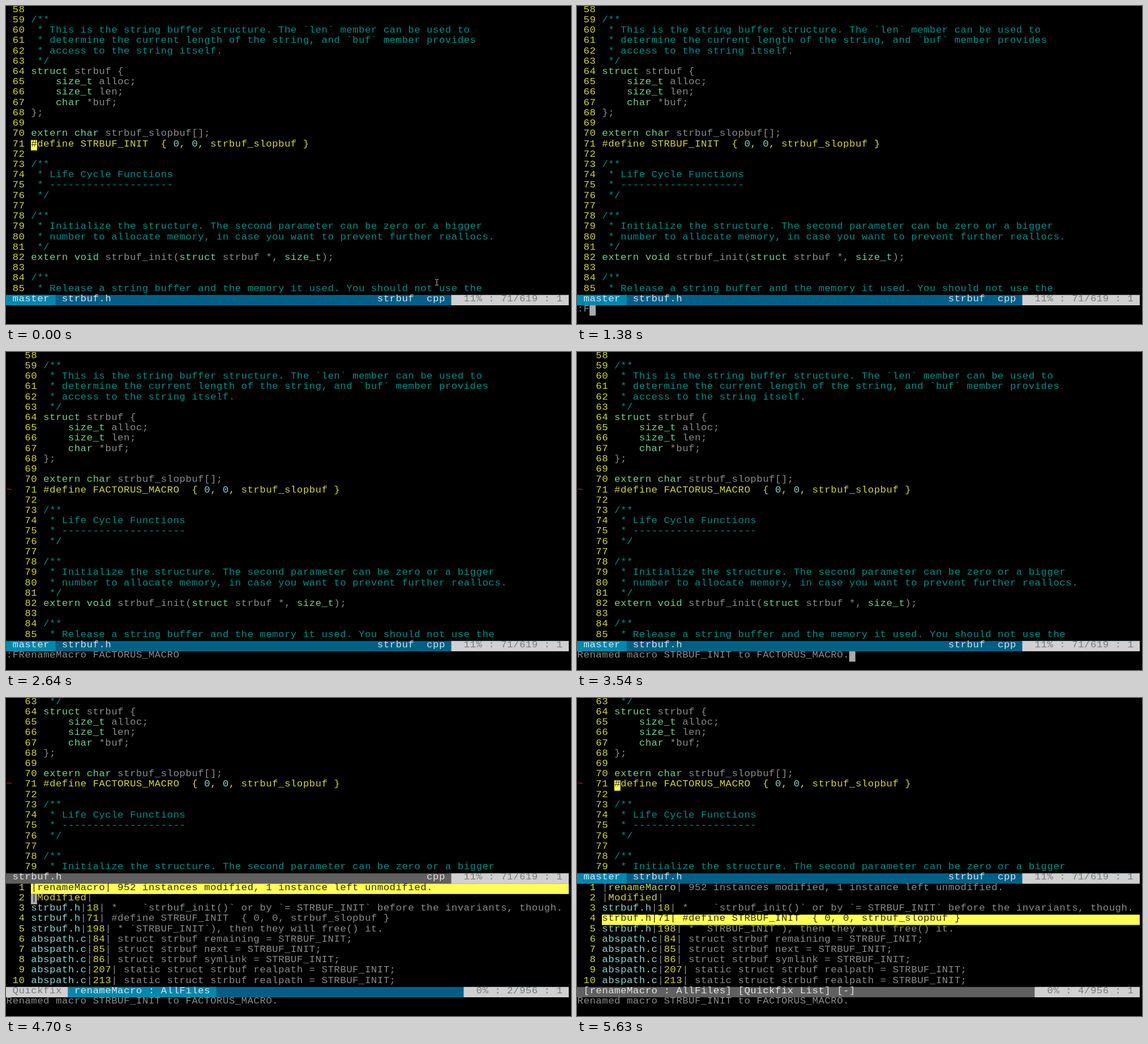
Write an HTML page with a canvas that moves like this. It is 998 px wide and 561 px high and loops after 9930 ms.

```html
<!DOCTYPE html>
<html>
<head>
<meta charset="utf-8">
<style>
html, body { margin: 0; width: 100%; height: 100%; overflow: hidden; background: #000; }
canvas { display: block; }
</style>
</head>
<body>
<canvas id="stage" width="998" height="561"></canvas>
<script>
const ctx = document.getElementById('stage').getContext('2d');
const LOOP = 9930, COLS = 91, W = 10.92, H = 18.22, LEFT = 0.3, TOP = -0.4, BASE = 11.1;
const FONT = '17.4px "Liberation Mono", "Courier New", monospace';
const FG = '#aaa', YELLOW = '#ffff55', GREEN = '#87ffaf', CYAN = '#00aaaa', PALE = '#afffff';
const BLUE = '#005f87', LIGHT_BLUE = '#0087af', GREY = '#606060', SILVER = '#d0d0d0', DIM = '#666', WHITE = '#fff';
const OLD = 'STRBUF_INIT', NEW = 'FACTORUS_MACRO';
const COMMAND = ':FRenameMacro ' + NEW;
const MESSAGE = `Renamed macro ${OLD} to ${NEW}.`;

// Buffer lines 58 to 85
const source = `
/**
 * This is the string buffer structure. The \`len\` member can be used to
 * determine the current length of the string, and \`buf\` member provides
 * access to the string itself.
 */
struct strbuf {
    size_t alloc;
    size_t len;
    char *buf;
};

extern char strbuf_slopbuf[];
#define STRBUF_INIT  { 0, 0, strbuf_slopbuf }

/**
 * Life Cycle Functions
 * --------------------
 */

/**
 * Initialize the structure. The second parameter can be zero or a bigger
 * number to allocate memory, in case you want to prevent further reallocs.
 */
extern void strbuf_init(struct strbuf *, size_t);

/**
 * Release a string buffer and the memory it used. You should not use the`.split('\n');

const quickfix = `|renameMacro| 952 instances modified, 1 instance left unmodified.
|Modified|
strbuf.h|18| *    \`strbuf_init()\` or by \`= STRBUF_INIT\` before the invariants, though.
strbuf.h|71| #define STRBUF_INIT  { 0, 0, strbuf_slopbuf }
strbuf.h|198| * \`STRBUF_INIT\`), then they will free() it.
abspath.c|84| struct strbuf remaining = STRBUF_INIT;
abspath.c|85| struct strbuf next = STRBUF_INIT;
abspath.c|86| struct strbuf symlink = STRBUF_INIT;
abspath.c|207| static struct strbuf realpath = STRBUF_INIT;
abspath.c|213| static struct strbuf realpath = STRBUF_INIT;`.split('\n');

const x = col => LEFT + col * W;
const y = row => TOP + row * H;

function fill(row, col, count, color) {
  const left = col ? x(col) : 0;
  ctx.fillStyle = color;
  ctx.fillRect(left, y(row), x(col + count) - left, H);
}

// Writes thin text on the grid and returns the next column
function put(row, col, text, color) {
  ctx.fillStyle = color;
  ctx.globalAlpha = 0.82;
  for (const ch of text) {
    if (ch !== ' ') ctx.fillText(ch, x(col + 0.5), y(row) + BASE);
    col++;
  }
  ctx.globalAlpha = 1;
  return col;
}

// Text on its own background, clipped to the cells
function label(row, col, text, color, bg) {
  fill(row, col, text.length, bg);
  ctx.save();
  ctx.beginPath();
  ctx.rect(x(col), y(row), text.length * W, H);
  ctx.clip();
  put(row, col, text, color);
  ctx.restore();
}

function codeLine(row, col, line) {
  if (/^ ?[/*]/.test(line)) return put(row, col, line, CYAN);
  const macro = line[0] === '#';
  const marked = macro ? /(\b\d\b)/ : /\b(struct|size_t|char|extern|void)\b/;
  line.split(marked).forEach((part, i) => {
    const color = i % 2 ? (macro ? PALE : GREEN) : (macro ? YELLOW : FG);
    col = put(row, col, part, color);
  });
}

function code(first, count, renamed, cursor) {
  const gutter = renamed ? 2 : 0;
  for (let row = 0; row < count; row++) {
    const number = first + row, col = gutter + 4;
    const line = source[number - 58];
    put(row, gutter + 1, String(number), YELLOW);
    codeLine(row, col, renamed ? line.replace(OLD, NEW) : line);
    if (number === 71) {
      if (renamed) put(row, 0, '~', '#ff2020');
      if (cursor) label(row, col, '#', '#000', YELLOW);
    }
  }
}

function fileStatus(row, active) {
  fill(row, 0, COLS, active ? BLUE : GREY);
  if (active) {
    label(row, 0, ' master ', WHITE, LIGHT_BLUE);
    put(row, 9, 'strbuf.h', WHITE);
    put(row, 60, 'strbuf', WHITE);
  } else {
    put(row, 1, 'strbuf.h', WHITE);
  }
  put(row, 68, 'cpp', WHITE);
  label(row, 72, '  11% : 71/619 : 1 ', DIM, SILVER);
}

function list(entry, selected, active) {
  quickfix.forEach((line, i) => {
    const row = 18 + i, on = i === selected;
    put(row, 1, String(i + 1).padStart(2), YELLOW);
    if (on) fill(row, 4, COLS - 4, YELLOW);
    const [file, place, ...rest] = line.split('|');
    let col = put(row, 4, file, on ? '#000' : PALE);
    col = put(row, col, '|', on ? '#000' : FG);
    col = put(row, col, place, on ? '#000' : YELLOW);
    put(row, col, '|' + rest.join('|'), on ? '#000' : FG);
    if (active && i === entry - 1) {
      const bg = on ? '#000' : file ? PALE : FG;
      label(row, 4, line[0], on ? YELLOW : '#000', bg);
    }
  });
  fill(28, 0, COLS, active ? BLUE : GREY);
  if (active) {
    label(28, 0, ' Quickfix ', DIM, SILVER);
    label(28, 10, ' renameMacro : AllFiles ', WHITE, LIGHT_BLUE);
  } else {
    put(28, 1, '[renameMacro : AllFiles] [Quickfix List] [-]', WHITE);
  }
  label(28, 74, `  0% : ${entry}/956 : 1 `, DIM, SILVER);
}

function prompt(text, cursor) {
  const end = put(29, 0, text, FG);
  if (cursor) fill(29, end, 1, FG);
}

function mouse() {
  ctx.fillStyle = '#ccc';
  ctx.fillRect(760.5, 483, 1, 9);
  for (const top of [482, 492]) {
    ctx.fillRect(758, top, 2.5, 1);
    ctx.fillRect(761.5, top, 2.5, 1);
  }
}

function editor(renamed, text, cursor, start) {
  code(58, 28, renamed, start);
  fileStatus(28, true);
  prompt(text, cursor);
  if (start) mouse();
}

function split(entry, active) {
  code(63, 17, true, !active);
  fileStatus(17, !active);
  list(entry, active ? 0 : 3, active);
  prompt(MESSAGE, false);
}

const steps = [
  [0, () => editor(false, '', false, true)],
  [480, () => editor(false, '', false)],
  [520, () => editor(false, ':', true)],
  [1380, () => editor(false, ':F', true)],
  [1870, () => editor(false, COMMAND, true)],
  [2500, () => editor(false, COMMAND, false)],
  [2640, () => editor(true, COMMAND, false)],
  [3540, () => editor(true, MESSAGE, true)],
  [3630, () => split(1, true)],
  [4700, () => split(2, true)],
  [4920, () => split(3, true)],
  [5280, () => split(4, true)],
  [5630, () => split(4, false)]
];

let shown;
const begin = performance.now();
function frame() {
  const t = (performance.now() - begin) % LOOP;
  const step = steps.filter(s => s[0] <= t).pop();
  if (step !== shown) {
    shown = step;
    ctx.fillStyle = '#000';
    ctx.fillRect(0, 0, 998, 561);
    ctx.font = FONT;
    ctx.textAlign = 'center';
    step[1]();
  }
  requestAnimationFrame(frame);
}
frame();
</script>
</body>
</html>
```
